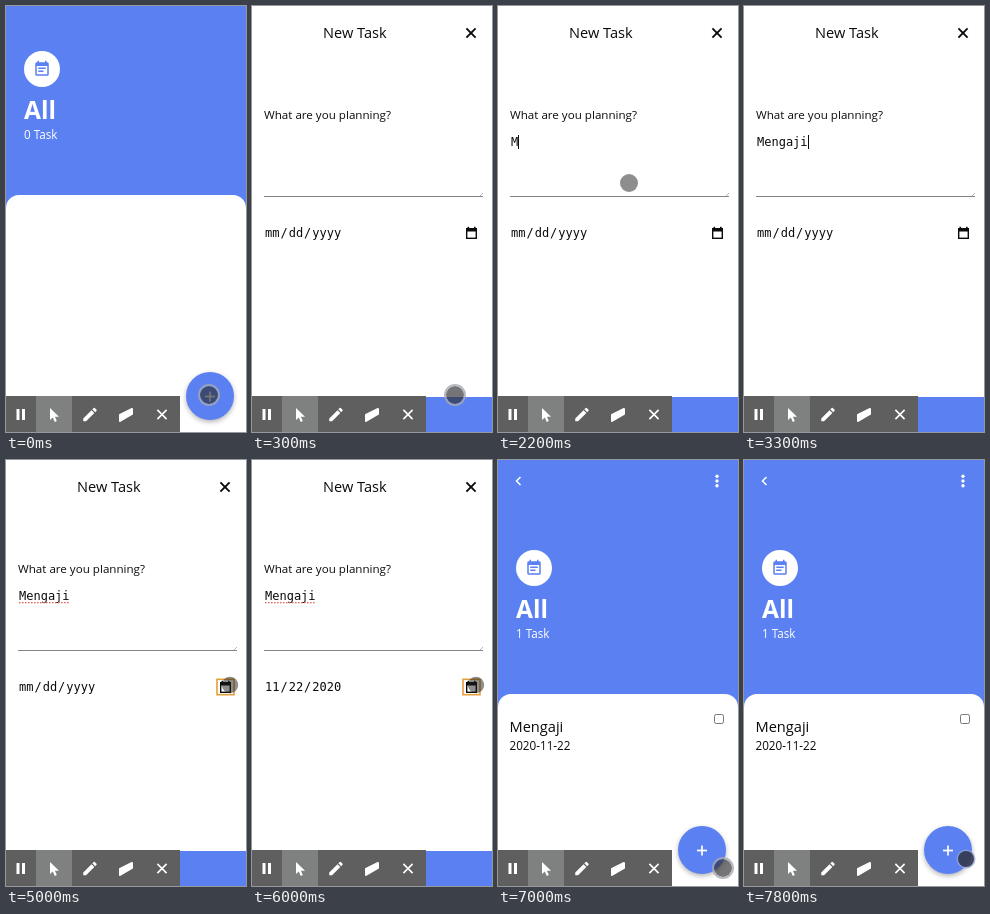
Write an HTML page with a canvas that moves like this. It is 240 px wide and 426 px high and loops after 8 s.

```html
<!DOCTYPE html>
<html lang="en">
<head>
<meta charset="utf-8">
<title>Task list</title>
<style>
html, body { margin: 0; width: 100%; height: 100%; overflow: hidden; background: #fff; }
canvas { display: block; width: 240px; height: 426px; }
</style>
</head>
<body>
<canvas id="stage"></canvas>
<script>
const W = 240, H = 426, LOOP = 8000, TICK = 100;
const BLUE = '#5b80f2', INK = '#0b0b0b';
const SANS = '"Open Sans", "Noto Sans", sans-serif';
const MONO = '12px "DejaVu Sans Mono", monospace';

const canvas = document.getElementById('stage');
const dpr = window.devicePixelRatio || 1;
canvas.width = W * dpr;
canvas.height = H * dpr;
const ctx = canvas.getContext('2d');

const noteIcon = new Path2D('M17 10H7v2h10v-2zM19 3h-1V1h-2v2H8V1H6v2H5a2 2 0 0 0-2 2v14a2 2 0 0 0 2 2h14a2 2 0 0 0 2-2V5a2 2 0 0 0-2-2zM19 19H5V8h14v11zM14 14H7v2h7v-2z');
const penIcon = new Path2D('M3 17.25V21h3.75L17.81 9.94l-3.75-3.75L3 17.25zM20.71 7.04a1 1 0 0 0 0-1.41l-2.34-2.34a1 1 0 0 0-1.41 0l-1.83 1.83 3.75 3.75 1.83-1.83z');
const arrowIcon = new Path2D('M44 402V414L46.8 411.6L48.8 416L50.8 415.1L48.9 410.8H53Z');

// Typing: time and number of letters shown
const TASK = 'Mengaji';
const typed = [[2200, 1], [2400, 2], [2500, 3], [2700, 4], [2900, 5], [3000, 6], [3200, 7]];
// Times between which the text caret is visible
const caretOn = [[1100, 1600], [2200, 3700], [4200, 4600]];
// Pointer moves: start, end, from, to
const moves = [
  [500, 1200, [203, 389], [131, 177]],
  [4400, 5000, [239, 201], [224, 225]],
  [6500, 6900, [224, 225], [225, 408]],
  [7300, 7800, [225, 408], [222, 399]]
];

const clamp = v => Math.max(0, Math.min(1, v));
const ease = p => p * p * (3 - 2 * p);
const within = (t, a, b) => t >= a && t < b;

function rect(x, y, w, h, color) {
  ctx.fillStyle = color;
  ctx.fillRect(x, y, w, h);
}

function disc(x, y, r, color) {
  ctx.fillStyle = color;
  ctx.beginPath();
  ctx.arc(x, y, r, 0, Math.PI * 2);
  ctx.fill();
}

function line(points, width, color) {
  ctx.strokeStyle = color;
  ctx.lineWidth = width;
  ctx.beginPath();
  points.forEach(([x, y]) => ctx.lineTo(x, y));
  ctx.stroke();
}

function cross(x, y, r, width, color) {
  line([[x - r, y - r], [x + r, y + r]], width, color);
  line([[x - r, y + r], [x + r, y - r]], width, color);
}

function text(str, x, y, font, color = INK) {
  ctx.font = font;
  ctx.fillStyle = color;
  ctx.fillText(str, x, y);
}

const sans = (size, weight = 400) => `${weight} ${size}px ${SANS}`;

function icon(path, cx, cy, scale, color) {
  ctx.save();
  ctx.translate(cx, cy);
  ctx.scale(scale, scale);
  ctx.translate(-12, -12);
  ctx.fillStyle = color;
  ctx.fill(path, 'evenodd');
  ctx.restore();
}

function addButton() {
  ctx.save();
  ctx.shadowColor = 'rgba(0,0,0,.3)';
  ctx.shadowBlur = 5 * dpr;
  ctx.shadowOffsetY = 2 * dpr;
  disc(204, 390, 24, BLUE);
  ctx.restore();
  line([[199, 390.5], [209, 390.5]], 1.7, '#fff');
  line([[204, 385.5], [204, 395.5]], 1.7, '#fff');
}

function listPage(scroll, count) {
  rect(0, 0, W, H, BLUE);
  ctx.save();
  ctx.translate(0, -scroll);
  line([[22.5, 17], [18.5, 21], [22.5, 25]], 1.5, '#fff');
  [16.3, 21, 25.7].forEach(y => disc(219, y, 1.7, '#fff'));
  disc(36, 108, 18, '#fff');
  icon(noteIcon, 36, 108, 0.75, BLUE);
  text('All', 18, 158, sans(24.6, 700), '#fff');
  text(count + ' Task', 18, 178, sans(11.7), '#fff');
  ctx.fillStyle = '#fff';
  ctx.beginPath();
  ctx.roundRect(0, 234, W, 300, [13, 13, 0, 0]);
  ctx.fill();
  if (count) {
    text(TASK, 11.5, 272, sans(14.6));
    text('2020-11-22', 11.5, 290, sans(11.7));
    ctx.strokeStyle = '#767676';
    ctx.lineWidth = 1;
    ctx.beginPath();
    ctx.roundRect(216.5, 254.5, 9, 9, 1.8);
    ctx.stroke();
  }
  ctx.restore();
  addButton();
}

function dateIcon() {
  rect(214, 222, 11, 3.5, INK);
  rect(215.5, 220.8, 1.6, 2, INK);
  rect(222, 220.8, 1.6, 2, INK);
  ctx.strokeStyle = INK;
  ctx.lineWidth = 1.4;
  ctx.strokeRect(214.7, 223, 9.6, 9.3);
}

function dateField(parts) {
  let x = 13;
  ctx.font = MONO;
  parts.forEach((part, i) => {
    if (i) {
      text('/', x + 1, 231, MONO);
      x += ctx.measureText('/').width + 2;
    }
    text(part, x, 231, MONO);
    x += ctx.measureText(part).width;
  });
}

function formPage(t) {
  rect(0, 0, W, H, '#fff');
  rect(0, 391, W, 35, BLUE);
  text('New Task', 71, 32, sans(14.6));
  cross(219, 27, 4.6, 1.9, INK);
  text('What are you planning?', 12, 113, sans(11.6));

  const letters = typed.reduce((n, [at, len]) => t >= at ? len : n, 0);
  const word = TASK.slice(0, letters);
  text(word, 13, 140, MONO);
  const end = Math.round(13 + ctx.measureText(word).width);
  if (caretOn.some(([a, b]) => within(t, a, b))) rect(end, 129, 1, 14, INK);
  if (t >= 4200) {
    for (let x = 13; x < 64; x += 3) rect(x, 142, 1.6, 1.3, '#dc6a62');
  }

  rect(12, 190, 219, 1, '#858585');
  line([[228, 190], [231, 187]], 0.7, '#999');

  dateField(t < 6000 ? ['mm', 'dd', 'yyyy'] : ['11', '22', '2020']);
  dateIcon();
  if (t >= 4900) {
    ctx.strokeStyle = '#e3a03a';
    ctx.lineWidth = 1.6;
    ctx.strokeRect(211, 219.3, 17, 15.4);
  }
}

function toolbar() {
  rect(0, 390, 174, 36, '#5f5f5f');
  rect(30, 390, 36, 36, '#7f8180');
  rect(10.5, 403, 3, 11, '#fff');
  rect(16, 403, 3, 11, '#fff');
  ctx.fillStyle = '#fff';
  ctx.fill(arrowIcon);
  icon(penIcon, 84, 408.5, 0.75, '#fff');
  ctx.fillStyle = ctx.strokeStyle = '#fff';
  ctx.lineWidth = 2;
  ctx.lineJoin = 'round';
  ctx.beginPath();
  [[114, 409], [126, 403], [126, 408], [114, 415]].forEach(([x, y]) => ctx.lineTo(x, y));
  ctx.closePath();
  ctx.fill();
  ctx.stroke();
  ctx.lineJoin = 'miter';
  cross(156, 408.5, 4.6, 1.6, '#fff');
}

function pointer(t) {
  if (within(t, 3200, 4200)) return;
  const [start, stop, from, to] = moves.find((m, i) => {
    const next = moves[i + 1];
    return !next || t < (i === 0 ? 4200 : next[0]);
  });
  const p = ease(clamp((t - start) / (stop - start)));
  const x = from[0] + (to[0] - from[0]) * p;
  const y = from[1] + (to[1] - from[1]) * p;
  const pressed = t < 600 || within(t, 6900, 7400);

  ctx.save();
  if (t < 4200) ctx.globalAlpha = 1 - clamp((t - 2800) / 400);
  if (pressed) {
    disc(x, y, 9, 'rgba(45,45,50,.66)');
    ctx.strokeStyle = 'rgba(165,168,178,.8)';
    ctx.lineWidth = 2;
    ctx.beginPath();
    ctx.arc(x, y, 10, 0, Math.PI * 2);
    ctx.stroke();
  } else if (t >= 7400) {
    disc(x, y, 9.5, 'rgba(150,165,215,.75)');
    disc(x, y, 8, 'rgba(30,32,50,.75)');
  } else {
    disc(x, y, t < 4200 ? 9 : 8.2, 'rgba(30,30,30,.5)');
  }
  ctx.restore();
}

function draw(now) {
  const t = Math.floor((now % LOOP) / TICK) * TICK;
  ctx.setTransform(dpr, 0, 0, dpr, 0, 0);
  if (t < 300) listPage(45, 0);
  else if (t < 7000) formPage(t);
  else listPage(0, 1);
  toolbar();
  pointer(t);
}

let origin = null;
function loop(now) {
  if (origin === null) origin = now;
  draw(now - origin);
  requestAnimationFrame(loop);
}
draw(0);
requestAnimationFrame(loop);
</script>
</body>
</html>
```
